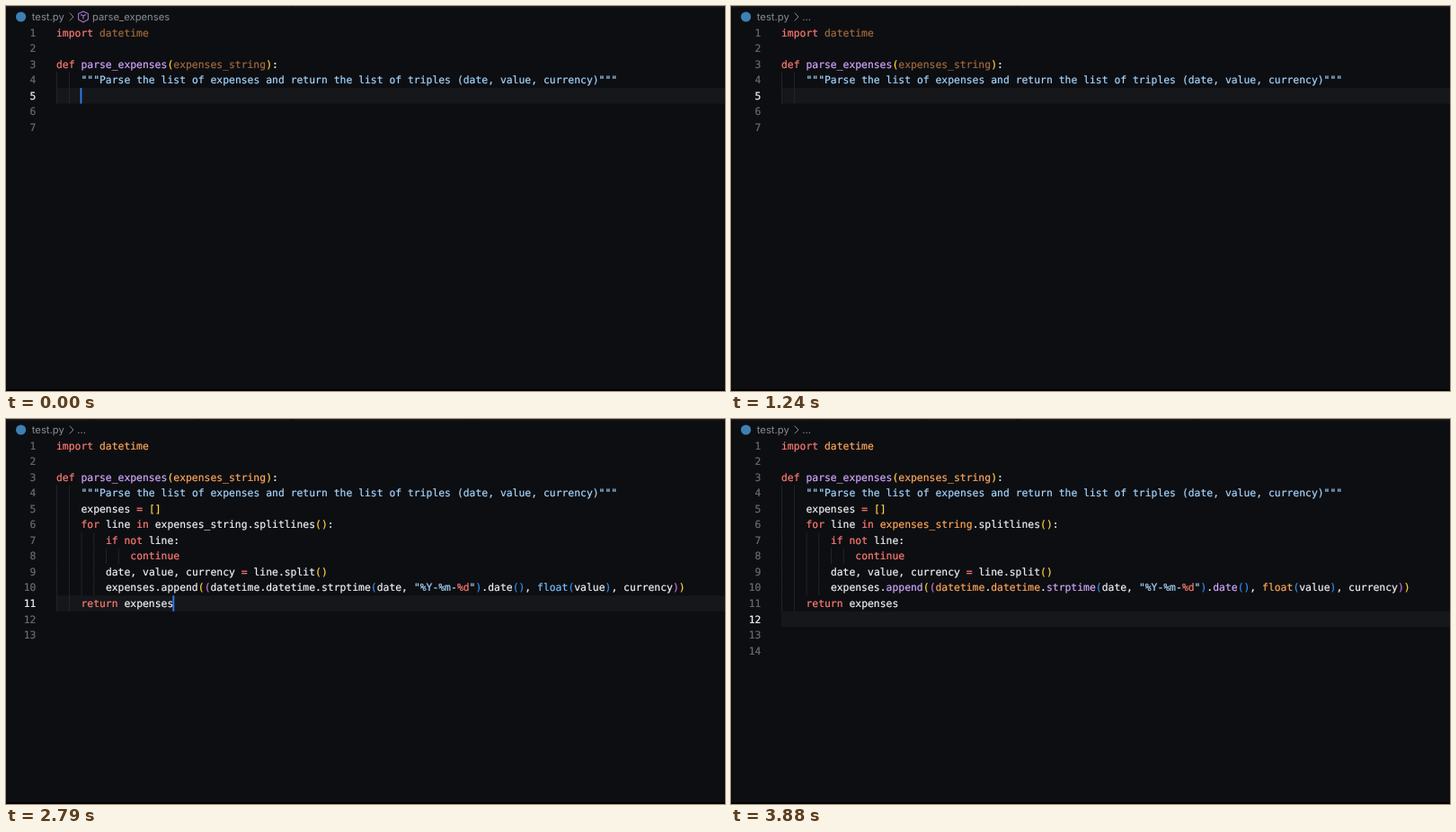
These frames come from a looping animation (800 px wide and 428 px high, 3.91 s). An HTML page:

```html
<!DOCTYPE html>
<html lang="en">
<head>
<meta charset="utf-8">
<title>Code completion</title>
<style>
  html, body { margin: 0; width: 100%; height: 100%; overflow: hidden; background: #0d0e12; }
  svg { display: block; }
  text { text-rendering: geometricPrecision; white-space: pre; }
  .code { font: 11.39px "DejaVu Sans Mono", monospace; stroke-width: .2px; }
  .crumb { font: 11.25px Inter, sans-serif; fill: #8a8c91; }
</style>
</head>
<body>
<svg id="stage" width="800" height="428" viewBox="0 0 800 428"></svg>
<script>
const LOOP = 3910;
const LEFT = 56, CHAR = 6.86, TOP = 20.85, ROW = 17.54;
const stage = document.getElementById('stage');

// x{...} gives a run of code the style x
const HEAD = [
  'k{import} u{datetime}',
  '',
  'k{def} f{parse_expenses}1{(}u{expenses_string}1{)}:',
  '    s{"""Parse the list of expenses and return the list of triples (date, value, currency)"""}'
];
const BODY = [
  '    expenses K{=} 1{[]}',
  '    K{for} line K{in} p{expenses_string}.splitlines1{()}:',
  '        K{if} K{not} line:',
  '            K{continue}',
  '        date, value, currency K{=} line.split1{()}',
  '        expenses.m{append}1{(}2{(}p{datetime}.p{datetime}.m{strptime}3{(}date, S{"%Y-%m-}d{%d}S{"}3{)}.m{date}3{()}, b{float}3{(}value3{)}, currency2{)}1{)}',
  '    K{return} expenses'
];

const WHITE = '#f0f3f6', RED = '#ff7b72', ORANGE = '#ffa657', PURPLE = '#d2a8ff',
      BLUE = '#79c0ff', STRING = '#a5d6ff', DIM = '#a26a3c', GHOST = '#5c5e63';

// Colours per style: plain, highlighted, fully analysed
const COLORS = {
  t: [WHITE], k: [RED], s: [STRING], f: [PURPLE],
  u: [DIM, ORANGE], K: [WHITE, RED], S: [WHITE, STRING], d: [WHITE, RED],
  m: [WHITE, WHITE, PURPLE], p: [WHITE, WHITE, ORANGE], b: [WHITE, BLUE, ORANGE],
  1: ['#ffd33d'], 2: ['#c678d0'], 3: ['#2f8fef']
};

// Each step changes part of the state from its time on
const STEPS = [
  [0, { mode: 'empty', level: 0, row: 4, col: 4, cursor: true, symbol: true }],
  [210, { cursor: false }],
  [330, { symbol: false }],
  [700, { cursor: true }],
  [1200, { cursor: false }],
  [1410, { mode: 'ghost' }],
  [1700, { cursor: true }],
  [2200, { cursor: false }],
  [2320, { mode: 'filled', row: 10, col: 19, cursor: true }],
  [2430, { level: 1 }],
  [2830, { level: 2 }],
  [2950, { mode: 'newline', row: 11, col: 2 }],
  [3060, { symbol: true }],
  [3320, { col: 0 }],
  [3480, { symbol: false }],
  [3810, { cursor: false }]
];

function add(name, attrs, text) {
  const el = document.createElementNS('http://www.w3.org/2000/svg', name);
  for (const key in attrs) el.setAttribute(key, attrs[key]);
  if (text) el.textContent = text;
  stage.append(el);
}

const rect = (x, y, width, height, fill) => add('rect', { x, y, width, height, fill });
const xAt = col => LEFT + col * CHAR;
const yAt = row => TOP + row * ROW;
const baseline = row => yAt(row) + 12.75;
const indentOf = line => line.search(/\S|$/);
const plain = line => line.replace(/\w\{([^}]*)\}/g, '$1');

function words(str, row, col, fill, extra) {
  for (const word of str.matchAll(/\S+/g)) {
    add('text', {
      class: 'code', x: xAt(col + word.index), y: baseline(row), fill, stroke: fill, ...extra
    }, word[0]);
  }
}

function codeLine(line, row, level) {
  let col = 0;
  for (const [all, style, run] of line.matchAll(/(\w)\{([^}]*)\}|(?:(?!\w\{).)+/g)) {
    const str = run ?? all, tones = COLORS[style || 't'];
    words(str, row, col, tones[Math.min(level, tones.length - 1)]);
    col += str.length;
  }
}

function guides(row, indent) {
  for (let col = 0; col < indent; col += 2) rect(xAt(col) + .2, yAt(row), .9, ROW, '#25272c');
}

function lineNumber(n, row, active) {
  const fill = active ? WHITE : '#686b71';
  add('text', {
    class: 'code', x: 33.4, y: baseline(row), 'text-anchor': 'end', fill, stroke: fill
  }, String(n));
}

function breadcrumb(symbol) {
  add('circle', { cx: 16.6, cy: 12, r: 5.6, fill: '#3d80b4' });
  add('text', { class: 'crumb', x: 28.8, y: 16 }, 'test.py');
  add('path', { d: 'M70.8 7.6 75 12l-4.2 4.4', fill: 'none', stroke: '#8a8c91' });
  if (!symbol) {
    add('text', { class: 'crumb', x: 79.2, y: 16 }, '...');
    return;
  }
  add('path', {
    d: 'M86 6l5.4 2.5v6.4L86 18l-5.4-3.1V8.500zM83 9.600l3 1.500 3-1.500M86 11.100v3.400',
    fill: 'none', stroke: '#a276cc', 'stroke-width': 1.1, 'stroke-linejoin': 'round'
  });
  add('text', { class: 'crumb', x: 96, y: 16 }, 'parse_expenses');
}

function draw(s) {
  stage.replaceChildren();
  rect(0, 0, 800, 428, '#0d0e12');
  rect(0, 0, 800, 1.4, '#1c1e23');
  for (const x of [94, 213, 318, 518]) rect(x, 0, 1, 1.4, '#0a0b0e');
  rect(0, 426, 800, 2, '#030304');
  breadcrumb(s.symbol);

  rect(LEFT, yAt(s.row), 800 - LEFT, ROW, '#15171b');
  const filled = s.mode === 'filled' || s.mode === 'newline';
  const lines = filled ? [...HEAD, ...BODY] : HEAD;
  lines.forEach((line, row) => {
    guides(row, indentOf(plain(line)));
    codeLine(line, row, s.level);
  });
  if (s.mode !== 'filled') guides(s.row, s.col);

  if (s.mode === 'ghost') {
    BODY.forEach((line, i) => words(plain(line), 4 + i, 0, GHOST, { 'font-style': 'italic' }));
  }

  const count = { empty: 7, ghost: 7, filled: 13, newline: 14 }[s.mode];
  for (let i = 0; i < count; i++) {
    const shift = s.mode === 'ghost' && i > 4 ? BODY.length - 1 : 0;
    lineNumber(i + 1, i + shift, i === s.row);
  }
  if (s.cursor) rect(xAt(s.col) - .9, yAt(s.row), 1.8, ROW, '#2f81f7');
}

let shown = -1;
const start = performance.now();
function tick() {
  const t = (performance.now() - start) % LOOP;
  const passed = STEPS.filter(([at]) => at <= t);
  if (passed.length !== shown) {
    shown = passed.length;
    draw(Object.assign({}, ...passed.map(step => step[1])));
  }
  requestAnimationFrame(tick);
}
tick();
</script>
</body>
</html>
```
